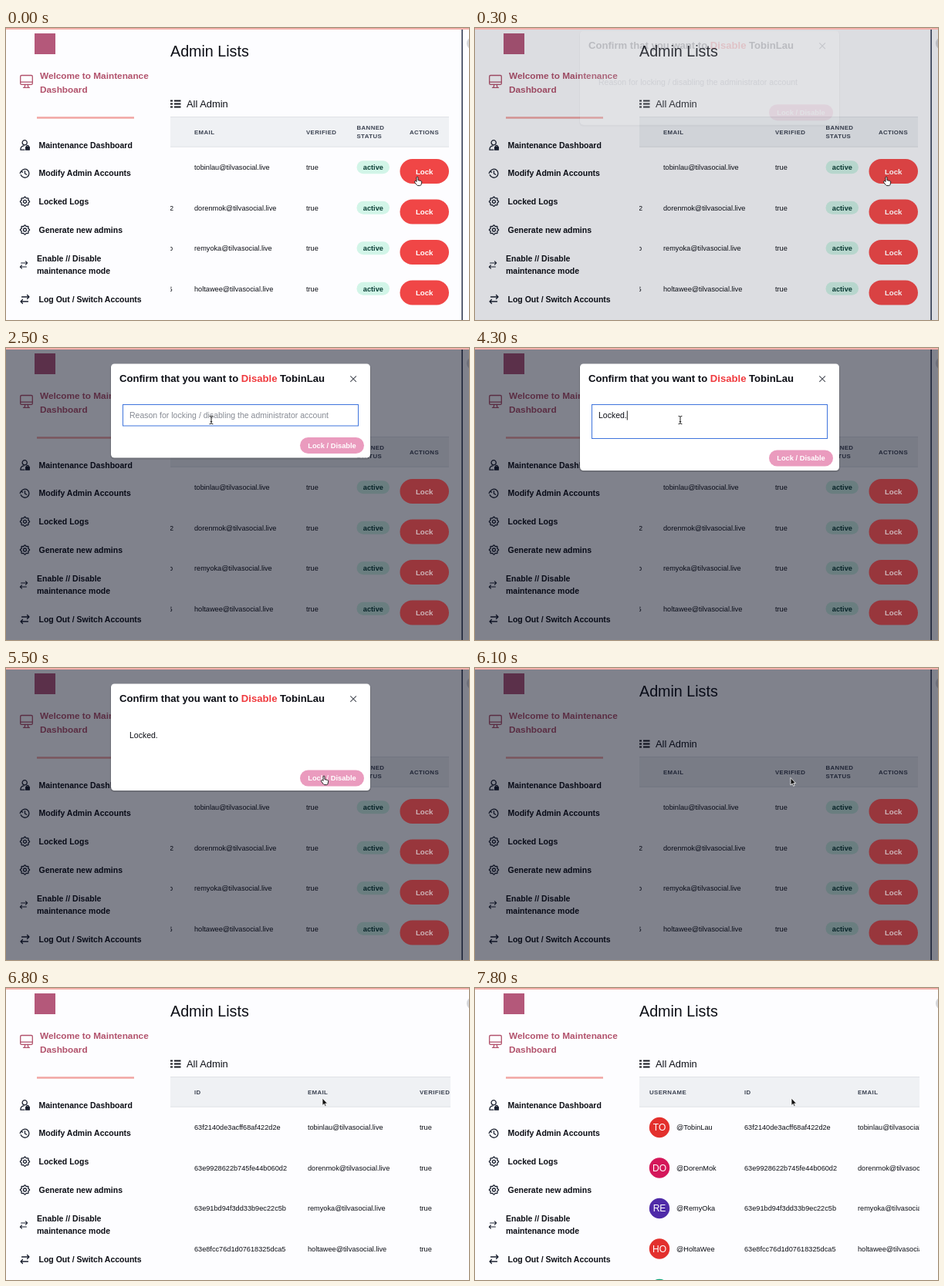
Recreate the animation shown at these times as an HTML page. Size 600x379 px, loop 8000 ms.

```html
<!DOCTYPE html>
<html lang="en">
<head>
<meta charset="utf-8">
<title>Admin Lists</title>
<style>
  html, body { margin: 0; width: 100%; height: 100%; overflow: hidden; background: #fdfdff; }
  svg { display: block; width: 600px; height: 379px; }
  text { font-family: "Liberation Sans", Arial, sans-serif; fill: #0c0e15; }
  .b { font-weight: 700; }
  .line { fill: none; stroke: #1b2130; stroke-width: 1.3; stroke-linecap: round; stroke-linejoin: round; }
  .head { font-weight: 700; font-size: 7.85px; letter-spacing: .05em; fill: #3c4352; }
  .rose text { fill: #b2526c; }
  .rose .line { stroke: #b2526c; }
  #locks text { fill: inherit; }
</style>
</head>
<body>
<svg id="stage" viewBox="0 0 600 379"></svg>
<script>
const LOOP = 8000, STEP = 100, SCROLL = 252;
const ROW_Y = 181, ROW_GAP = 52.5;

const people = [
  ['TobinLau', '63f2140de3acff68af422d2e', '#e3302d'],
  ['DorenMok', '63e9928622b745fe44b060d2', '#d4175a'],
  ['RemyOka', '63e91bd94f3dd33b9ec22c5b', '#4f2ba8'],
  ['HoltaWee', '63e8fcc76d1d07618325dca5', '#e3302d'],
  ['SelmaQuo', '63e8fa10b27c45d1908e6f3b', '#12a67c']
];

const text = (x, y, size, str, attrs = '') =>
  `<text x="${x}" y="${y}" font-size="${size}" ${attrs}>${str}</text>`;
const bold = (x, y, size, str, attrs = '') => text(x, y, size, str, `class="b" ${attrs}`);
const head = (x, y, str) => `<text class="head" x="${x}" y="${y}">${str}</text>`;
const icon = (x, y, body, scale = 1) =>
  `<g class="line" transform="translate(${x} ${y}) scale(${scale})">${body}</g>`;

// Eight-toothed outline: a circle with a wavy radius.
const gearPoints = Array.from({ length: 64 }, (_, i) => {
  const a = i / 32 * Math.PI, r = 5.4 + .7 * Math.cos(8 * a);
  return `${(r * Math.cos(a)).toFixed(2)},${(r * Math.sin(a)).toFixed(2)}`;
}).join(' ');

const icons = {
  user: `<circle cx="-.3" cy="-3.2" r="3.1"/><path d="M-5.6 6.2q0-5 4.3-5.4M-5.6 6.2h5"/>
    <rect x="1.2" y="2.4" width="4.6" height="3.8" fill="#1b2130"/><path d="M2.2 2.2v-1q1.3-1.6 2.6 0v1"/>`,
  history: '<path d="M-5 -2.4A5.5 5.5 0 1 1-5.2 2M-6.3-.2l1.2-2.4 2.3 1M0-3v3.3l2.3 1.3"/>',
  gear: `<polygon points="${gearPoints}"/><circle r="2"/>`,
  swap: '<path d="M-4-3h9.5M3-5.5 5.5-3 3-.5M4 3h-9.5M-3 .5-5.5 3-3 5.5"/>',
  screen: '<rect x="-7.8" y="-8" width="15.6" height="11.8" rx="1.4"/><path d="M-7.8.6h15.6M-1.7 3.8l-.7 4M1.7 3.8l.7 4M-4 7.8h8"/>'
};

const sidebar = `
  <rect x="37" y="7" width="27" height="27" fill="#b4587a"/>
  <g class="rose">${icon(26.5, 69.5, icons.screen)}
    ${bold(44, 65.5, 11.8, 'Welcome to Maintenance')}${bold(44, 83.5, 11.8, 'Dashboard')}</g>
  <rect x="40" y="115.2" width="126" height="2.5" fill="#f2a6a3"/>
  ${[[152, 'user', 'Maintenance Dashboard'], [188.7, 'history', 'Modify Admin Accounts'],
     [225.3, 'gear', 'Locked Logs'], [262, 'gear', 'Generate new admins'],
     [352, 'swap', 'Log Out / Switch Accounts']]
    .map(([y, name, label]) => icon(24.5, y, icons[name]) + bold(42.5, y + 3.7, 10.5, label)).join('')}
  ${icon(23, 307.5, icons.swap, .85)}
  ${bold(40, 303, 10.5, 'Enable // Disable')}${bold(40, 318.7, 10.5, 'maintenance mode')}`;

const rowHtml = ([name, id, color], i) => {
  const y = ROW_Y + i * ROW_GAP, base = y + 3.2;
  return `<circle cx="-13" cy="${y}" r="13.2" fill="${color}"/>
    ${text(-13, y + 4.3, 12, name.slice(0, 2).toUpperCase(), 'text-anchor="middle" style="fill:#fff"')}
    ${text(9, base, 9.2, '@' + name)}${text(97, base, 9.2, id)}
    ${text(244, base, 9.2, name.toLowerCase() + '@tilvasocial.live')}${text(389, base, 9.2, 'true')}
    <rect x="454.5" y="${y - 8.7}" width="42.5" height="17" rx="8.5" fill="#d2f5e8"/>
    ${bold(462.8, y + 3, 9.2, 'active', 'style="fill:#0b3f36"')}`;
};

const lockHtml = (_, i) => {
  const y = ROW_Y + 5 + i * ROW_GAP;
  return `<rect x="510.5" y="${y - 16}" width="63.5" height="32" rx="16"/>
    ${bold(542.2, y + 3.6, 9.7, 'Lock', 'text-anchor="middle"')}`;
};

const cursors = {
  hand: `<path d="M-1 1.1a1 1 0 0 1 2 0V4.6l3.6.8q1.3.4 1.1 1.7l-.6 3q-.4 1.5-1.6 1.5H.8q-.9 0-1.5-.9L-3.4 7.2
    q-.6-1.2.5-1.6t1.9.9z" fill="#fff" stroke="#111" stroke-width=".9"/>`,
  arrow: `<path d="M0 0V9.5L2.2 7.5 3.6 10.8 5.1 10.1 3.7 7H6.6Z" fill="#111" stroke="#fff" stroke-width=".8"/>`,
  beam: `<path d="M-2.4-5.2Q0-5.2 0-3.8V3.8Q0 5.2-2.4 5.2M2.4-5.2Q0-5.2 0-3.8M0 3.8Q0 5.2 2.4 5.2M-1.2 2h2.4"
    fill="none" stroke="#222" stroke-width="1"/>`
};

const stage = document.getElementById('stage');
stage.innerHTML = `
  <clipPath id="view"><rect x="213" y="110" width="363" height="269"/></clipPath>
  <rect width="600" height="379" fill="#fdfdff"/>
  ${sidebar}
  ${text(213, 37, 19.7, 'Admin Lists')}
  <path d="M213 94.5h3M213 98.5h3M213 102.5h3M218 94.5h8.5M218 98.5h8.5M218 102.5h8.5" stroke="#16181f" stroke-width="1.8"/>
  ${text(234, 103, 12.9, 'All Admin')}
  <g clip-path="url(#view)">
    <g id="table">
      <rect x="-39" y="115" width="613" height="39.5" fill="#eff1f4"/>
      <path d="M-39 115.5h613M-39 154.2h613" stroke="#dcdfe4" stroke-width=".8"/>
      ${head(-26, 137.5, 'USERNAME')}${head(97, 137.5, 'ID')}${head(244, 137.5, 'EMAIL')}
      ${head(389, 137.5, 'VERIFIED')}${head(454.5, 132, 'BANNED')}${head(454.5, 142.7, 'STATUS')}
      ${head(523, 137.5, 'ACTIONS')}
      ${people.map(rowHtml).join('')}
    </g>
  </g>
  <circle cx="605" cy="20" r="8" fill="#d5d6da"/>
  <rect id="edge" x="590.4" y="2" width="1.5" height="377" fill="#26314a"/>
  <rect id="shade" y="2" width="600" height="377" fill="#04081a"/>
  <g clip-path="url(#view)"><g id="locks">${people.map(lockHtml).join('')}</g></g>
  <rect width="600" height="2" fill="#f3b0aa"/>
  <g id="modal">
    <rect id="glow" x="135" y="21" width="338" rx="5" fill="#000" opacity=".15"/>
    <rect id="panel" x="136" y="20.5" width="336" rx="4.5" fill="#fff"/>
    ${bold(147, 44, 13.1, `Confirm that you want to <tspan fill="#f03a3e">Disable</tspan> ${people[0][0]}`)}
    <path d="M446.3 36.3l7.6 7.6M453.9 36.3l-7.6 7.6" stroke="#4b4f58" stroke-width="1.1"/>
    <rect id="ring" x="151.5" y="73.5" width="305" fill="none" stroke="#3f74dc"/>
    ${text(160, 91, 10.5, 'Reason for locking / disabling the administrator account', 'id="hint" style="fill:#868a93"')}
    ${text(160, 91, 10.5, '', 'id="typed"')}
    <rect id="caret" y="81.5" width="1" height="12" fill="#222"/>
    <g id="confirm">
      <rect x="381" y="116" width="83" height="21" rx="10.5" fill="#ea9bbe"/>
      ${bold(422.5, 129.8, 9.3, 'Lock / Disable', 'text-anchor="middle" style="fill:#fff"')}
    </g>
  </g>
  <g id="cursor">${Object.entries(cursors).map(([k, v]) => `<g id="${k}">${v}</g>`).join('')}</g>`;

const $ = id => document.getElementById(id);
const set = (id, attrs) => { for (const k in attrs) $(id).setAttribute(k, attrs[k]); };
const show = (id, on) => set(id, { visibility: on ? 'inherit' : 'hidden' });
const ease = p => p * p * (3 - 2 * p);

// Piecewise track of [time, value], eased between points.
function track(t, keys) {
  if (t <= keys[0][0]) return keys[0][1];
  for (let i = 1; i < keys.length; i++) {
    const [a, u] = keys[i - 1], [b, v] = keys[i];
    if (t <= b) return u + (v - u) * ease((t - a) / (b - a));
  }
  return keys[keys.length - 1][1];
}

const shadeKeys = [[200, 0], [500, 1], [6100, 1], [6200, .04], [6300, 0]];
const modalKeys = [[200, 0], [600, 1], [5600, 1], [6000, 0]];
const scrollKeys = [[6300, SCROLL], [7200, 0]];
const cursorX = [[300, 533], [900, 266], [4300, 266], [5000, 412], [5500, 412], [6000, 409], [6300, 409], [6500, 410]];
const cursorY = [[300, 193], [900, 93.5], [4300, 93.5], [5000, 140], [5500, 140], [6000, 142.5], [6300, 142.5], [6500, 143]];
const keyTimes = [3000, 3200, 3300, 3500, 3600, 3800, 4000];
const lockFill = [[240, 70, 70], [152, 54, 60]], lockLabel = [[255, 255, 255], [205, 180, 184]];
const mix = ([a, b], p) => `rgb(${a.map((v, i) => Math.round(v + (b[i] - v) * p))})`;

function pointer(t) {
  if (t < 500) return 'hand';
  if (t < 800) return 'arrow';
  if (t < 4700) return 'beam';
  if (t < 4900) return 'arrow';
  return t < 5900 ? 'hand' : 'arrow';
}

function draw(t) {
  const shade = track(t, shadeKeys), open = track(t, modalKeys);
  const move = { transform: `translate(${SCROLL - track(t, scrollKeys)} 0)` };
  set('table', move);
  set('locks', { ...move, fill: mix(lockFill, shade) });
  $('locks').querySelectorAll('text').forEach(e => { e.style.fill = mix(lockLabel, shade); });
  set('shade', { opacity: shade * .5 });
  show('edge', t < 6400);

  const typed = keyTimes.filter(k => t >= k).length, grow = typed ? 16.5 : 0;
  set('modal', { opacity: open, transform: `translate(0 ${(open - 1) * 20})` });
  set('panel', { height: 122 + grow });
  set('glow', { height: 123.5 + grow });
  set('ring', { height: 27.5 + grow });
  set('confirm', { transform: `translate(0 ${grow})` });
  show('ring', t >= 1000 && t < 5500);
  show('hint', !typed);
  $('typed').textContent = 'Locked.'.slice(0, typed);

  const lastKey = typed ? keyTimes[typed - 1] : 1000;
  show('caret', t >= 1000 && t < 5500 && (t - lastKey) % 1000 < 500);
  set('caret', { x: 160 + (typed ? $('typed').getComputedTextLength() : 0) });

  const kind = pointer(t);
  for (const k in cursors) set(k, { display: k === kind ? 'inline' : 'none' });
  show('cursor', t < 3000 || t >= 4000);
  set('cursor', { transform: `translate(${track(t, cursorX)} ${track(t, cursorY)})` });
}

function tick() {
  draw(Math.floor(performance.now() % LOOP / STEP) * STEP);
  requestAnimationFrame(tick);
}
tick();
</script>
</body>
</html>
```
